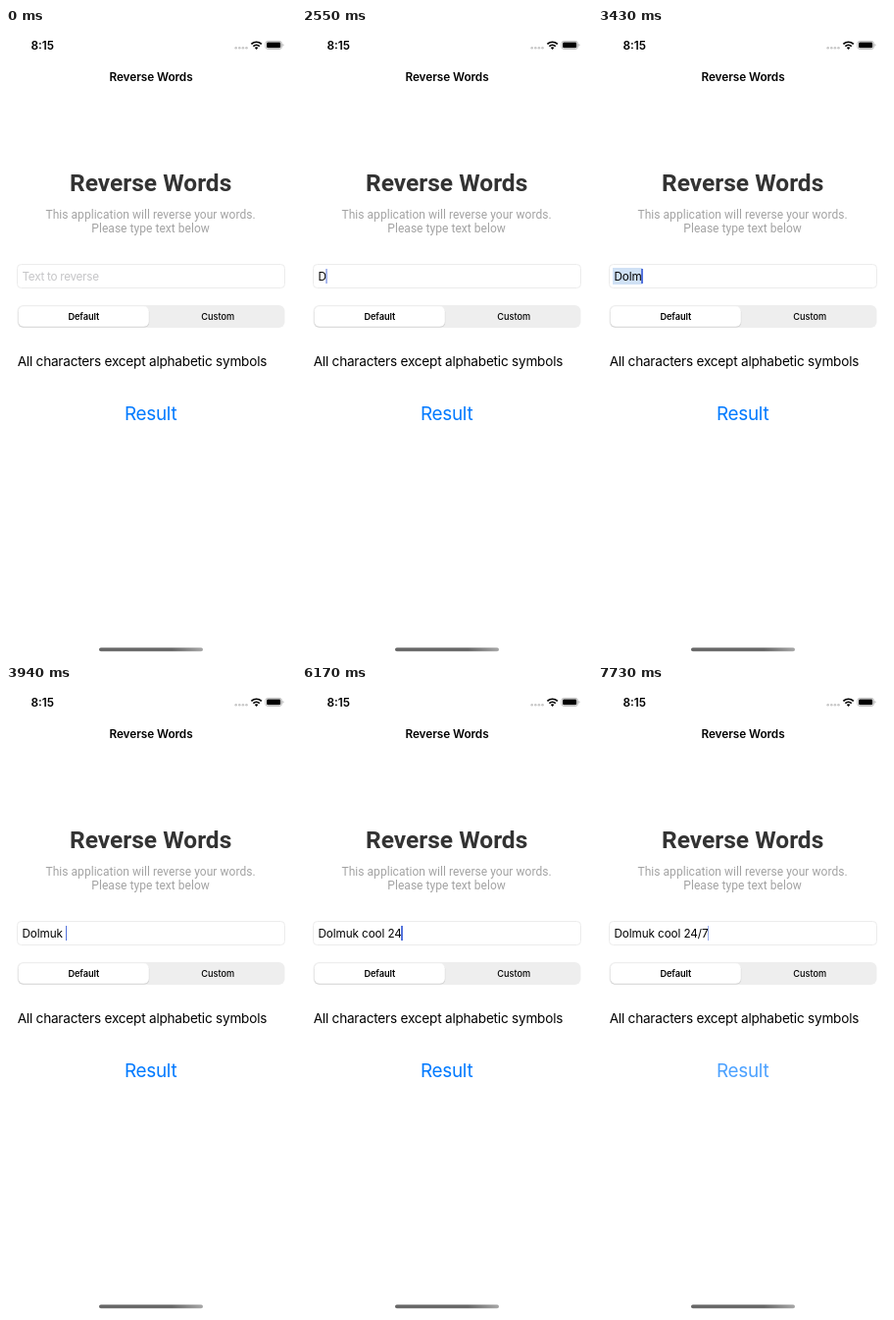
These frames come from a looping animation (296x640 px, 8 s). An HTML page:

```html
<!DOCTYPE html>
<html lang="en">
<head>
<meta charset="utf-8">
<title>Reverse Words</title>
<style>
  html, body { margin: 0; width: 100%; height: 100%; overflow: hidden; background: #fff; }
  svg { position: absolute; left: 0; top: 0; font-family: Inter, sans-serif; }
  .mid { text-anchor: middle; }
  .roboto { font-family: Roboto, sans-serif; }
  #field {
    position: absolute; left: 16.5px; top: 244px; height: 17px;
    font: 11.7px/18px Inter, sans-serif; white-space: pre; color: #000;
  }
  #typed { display: inline-block; height: 17px; letter-spacing: -.08px; vertical-align: top; }
  #typed.marked { background: #d0e1f5; box-shadow: -2px 0 #d0e1f5; }
  #caret {
    display: inline-block; width: 1.4px; height: 15px; margin: .5px -1.4px 0 -.4px;
    background: #5473dc; vertical-align: top;
  }
  #hint { position: absolute; left: 0; top: 0; color: #c5c5c7; letter-spacing: -.27px; }
</style>
</head>
<body>
<svg width="296" height="640" viewBox="0 0 296 640">
  <defs>
    <linearGradient id="bar">
      <stop offset=".7" stop-color="#686868"/>
      <stop offset="1" stop-color="#a8a8a8"/>
    </linearGradient>
  </defs>

  <text x="25.4" y="22" font-size="11.8" font-weight="600">8:15</text>
  <g fill="#c8c8c8">
    <circle cx="234.7" cy="20.3" r="1.3"/><circle cx="238.3" cy="20.3" r="1.3"/>
    <circle cx="241.9" cy="20.3" r="1.3"/><circle cx="245.5" cy="20.3" r="1.3"/>
  </g>
  <g fill="none" stroke="#000" stroke-width="1.7">
    <path d="M250.4 16.4a7.4 7.4 0 0 1 10.4 0"/>
    <path d="M252.4 18.7a4.6 4.6 0 0 1 6.4 0"/>
  </g>
  <path d="M253.8 20.1a2.6 2.6 0 0 1 3.6 0l-1.8 1.9z"/>
  <rect x="264.9" y="13.4" width="16.6" height="8" rx="2.4" fill="none" stroke="#aaa" stroke-width=".8"/>
  <rect x="266.1" y="14.6" width="14.2" height="5.6" rx="1.3"/>
  <path d="M282.5 16v2.8q1-.4 1-1.4t-1-1.4" fill="#aaa"/>

  <text class="mid" x="148" y="54.2" font-size="11.8" font-weight="600" letter-spacing="-.06">Reverse Words</text>

  <text class="mid roboto" x="147.7" y="165.6" font-size="24.5" font-weight="700" fill="#333">Reverse Words</text>
  <g class="mid roboto" font-size="12" fill="#a3a3a3" letter-spacing=".04">
    <text x="147.6" y="194.2">This application will reverse your words.</text>
    <text x="147.6" y="208.2">Please type text below</text>
  </g>

  <rect x="11.5" y="240.5" width="273" height="24" rx="4" fill="#fff" stroke="#ececec"/>

  <rect x="11.5" y="282" width="273" height="23" rx="6" fill="#eee"/>
  <rect x="12.5" y="284.2" width="133.8" height="20.6" rx="5" fill="#d6d6d6"/>
  <rect x="12.8" y="283.2" width="133" height="20.6" rx="5" fill="#fff"/>
  <g class="mid" font-size="9.2">
    <text x="79.3" y="297.2" font-weight="600" letter-spacing="-.05">Default</text>
    <text x="216.3" y="297.2" font-weight="500">Custom</text>
  </g>

  <text x="11.7" y="344.4" font-size="13.6" letter-spacing="-.22">All characters except alphabetic symbols</text>
  <text id="result" class="mid" x="147.6" y="398.7" font-size="18.9" letter-spacing="-.28" fill="#007aff">Result</text>

  <rect x="95" y="630.6" width="106" height="3.6" rx="1.8" fill="url(#bar)"/>
</svg>
<div id="field"><span id="hint">Text to reverse</span><span id="typed"></span><span id="caret"></span></div>

<script>
  const LOOP = 8000;
  const PHRASE = 'Dolmuk cool 24/7';
  // [time, typed characters]
  const KEYS = [
    [0, 0], [1920, 1], [2650, 2], [2980, 3], [3220, 4], [3640, 6], [3940, 7], [4370, 8],
    [4730, 9], [4930, 10], [5190, 11], [5350, 12], [5500, 13], [6170, 14], [6360, 15], [6750, 16]
  ];
  // [time, opacity]
  const CARET = [[0, 0], [1680, .5], [1800, 1], [2550, .5], [2650, 1], [7370, .4], [7610, 0], [7730, .6]];
  const RESULT = [[0, 1], [7730, .7]];

  const el = id => document.getElementById(id);
  const [typed, caret, hint, result] = ['typed', 'caret', 'hint', 'result'].map(el);
  const valueAt = (steps, t) => steps.filter(([start]) => start <= t).pop()[1];

  function draw(now) {
    const t = now % LOOP;
    const count = valueAt(KEYS, t);
    typed.textContent = PHRASE.slice(0, count);
    typed.className = t >= 3430 && t < 3940 ? 'marked' : '';
    hint.style.opacity = count ? 0 : 1;
    caret.style.opacity = valueAt(CARET, t);
    result.style.opacity = valueAt(RESULT, t);
  }

  const start = performance.now();
  function tick() {
    draw(performance.now() - start);
    requestAnimationFrame(tick);
  }
  tick();
</script>
</body>
</html>
```
